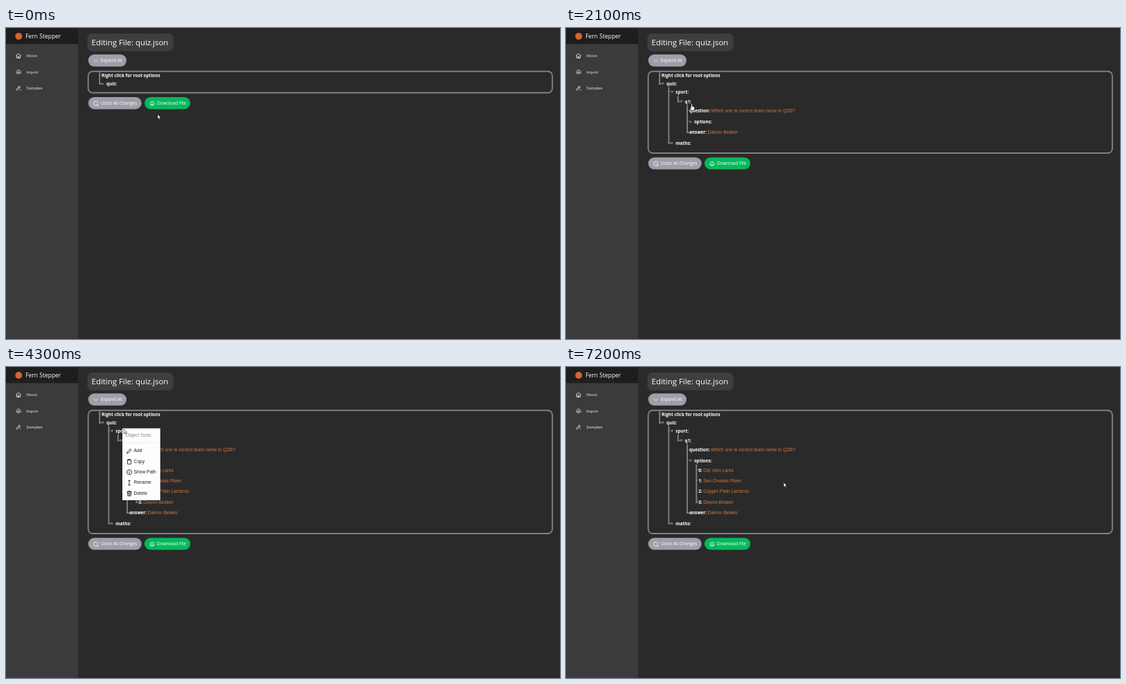
These frames come from a looping animation (800x450 px, 7300 ms). An HTML page:

```html
<!DOCTYPE html>
<html lang="en">
<head>
<meta charset="utf-8">
<title>Tree editor</title>
<style>
html, body { margin: 0; width: 100%; height: 100%; overflow: hidden; background: #2a2a2a; }
svg { display: block; width: 100%; height: 100%; }
text { font: 6.4px "Open Sans", sans-serif; fill: #fff; white-space: pre; }
.key { font-weight: 700; }
.val, .item { font: 6.667px "Liberation Sans", Arial, sans-serif; }
.val { fill: #d4733f; }
.item { fill: #222; }
.head { fill: #8a8a8a; }
.side { font: 6px "Liberation Sans", Arial, sans-serif; fill: #dedede; }
.icon { fill: none; stroke-width: 2.3; stroke-linejoin: round; stroke-linecap: round; }
</style>
</head>
<body>
<svg viewBox="0 0 800 450">
  <rect width="800" height="450" fill="#2a2a2a"/>
  <rect width="104" height="450" fill="#3b3b3d"/>
  <rect width="104" height="23.3" fill="#1e1e1e"/>
  <circle cx="18.3" cy="12" r="5" fill="#d3662c"/>
  <text x="28.2" y="15.4" style="font-size:8.5px">Fern Stepper</text>
  <g id="side"></g>
  <rect x="117.5" y="8" width="124.3" height="25.8" rx="7" fill="#3e3e3f"/>
  <text x="123.6" y="25.2" style="font-size:11.4px;font-weight:500">Editing File: quiz.json</text>
  <g id="expand"></g>
  <rect id="box" x="118.7" y="62.7" width="670.2" rx="6.5" fill="none" stroke="#808080" stroke-width="1.9"/>
  <g id="tree"></g>
  <g id="actions"></g>
  <g id="objMenu"></g>
  <g id="arrMenu"></g>
  <g id="cursor" fill="#fff" stroke="#111" stroke-width=".55" stroke-linejoin="round">
    <path id="arrow" d="M0 0V6.6L1.5 5.2L2.6 7.6L3.6 7.1L2.6 4.8H4.6Z"/>
    <path id="hand" d="M-.9 .6Q0-.6 .9 .6V3.4L3.4 4Q4.4 4.4 4.2 6L3.5 9.3H-.3L-2.4 6Q-2.6 4.6-.9 5.4Z"/>
  </g>
</svg>
<script>
const LOOP = 7300, STEP = 100, ROW = 15.4;
const $ = id => document.getElementById(id);

const cloud = 'M8 18H6A5 5 0 0 1 6 9A6.5 6.5 0 0 1 18.5 9A4.7 4.7 0 0 1 18 18h-2';
const icons = {
  home: 'M3 11L12 3l9 8M5 10v11h14V10M10 21v-6h4v6',
  upload: cloud + 'M12 21v-9M8.5 15l3.5-3.5 3.5 3.5',
  download: cloud + 'M12 11v10M8.5 17.5l3.5 3.5 3.5-3.5',
  tool: 'M3 18L13 8l3 3L6 21zM12 9l3-5 5 5-4 3M17 17l4 4',
  chevron: 'M5 9l7 7 7-7',
  undo: 'M18 18.5a8.8 8.8 0 1 1 2.8-6.5M15.5 16.5l5 .5v5',
  pencil: 'M3 21l1-5L16 4l4 4L8 20z',
  copy: 'M7 5H5v17h14V5h-2M8 3h8v4H8z',
  info: 'M2 12a10 10 0 1 1 20 0a10 10 0 1 1-20 0M12 11v6M12 7v.5',
  rename: 'M8 3h8M12 3v18M8 21h8',
  trash: 'M3 6h18M8 6V3h8v3M5 6l1 16h12l1-16M10 10v8M14 10v8'
};
const icon = (name, x, y, color, size = 8.6) =>
  `<path class="icon" stroke="${color}" d="${icons[name]}" transform="translate(${x - size / 2} ${y - size / 2}) scale(${size / 24})"/>`;
const text = (cls, x, y, s) => `<text class="${cls}" x="${x}" y="${y}">${s}</text>`;
const rect = (x, y, w, h, fill, extra = '') =>
  `<rect x="${x}" y="${y}" width="${w}" height="${h}" fill="${fill}" ${extra}/>`;
const button = (x, w, y, fill, name, label) =>
  rect(x, y - 8.7, w, 17.4, fill, 'rx="8.7"') + icon(name, x + 10.9, y + .4, '#fff') + text('', x + 18, y + 2.2, label);

$('side').innerHTML = [['home', 'About'], ['upload', 'Import'], ['tool', 'Samples']]
  .map(([name, label], i) => icon(name, 18, 40.2 + i * 23.3, '#eee') + text('side', 29.2, 42.2 + i * 23.3, label)).join('');
$('expand').innerHTML = button(118.8, 55.2, 47, '#9f9eaa', 'chevron', 'Expand All');

function menu(x, y, w, title, items) {
  const h = 27 + items.length * ROW;
  return rect(x - 1, y, w + 2, h + 1.5, '#000', 'opacity=".25" rx="1"') +
    rect(x, y, w, h, '#fdfdfd', 'rx=".8"') + text('item head', x + 5, y + 12, title) +
    rect(x + 3, y + 20.6, w - 6, .5, '#dcdcdc') +
    items.map(([name, label], i) => {
      const cy = y + 32.3 + i * 15.35;
      return icon(name, x + 10, cy + .4, '#111') + text('item', x + 16.6, cy + 2.3, label);
    }).join('');
}
const common = [['pencil', 'Add'], ['copy', 'Copy'], ['info', 'Show Path'], ['rename', 'Rename']];
$('objMenu').innerHTML = menu(168, 88.8, 54.8, 'Object Tools', [...common, ['trash', 'Delete']]);
$('arrMenu').innerHTML = menu(196.3, 132.9, 55.3, 'Array Tools', [...common, ['trash', 'Delete One'], ['trash', 'Delete All']]);

// Nodes: key, value for a leaf, or the level at which the kids are open
const leaf = (key, value) => ({ key, value });
const branch = (key, level, ...kids) => ({ key, level, kids });
const quiz = branch('quiz', 1,
  branch('sport', 2,
    branch('q1', 3,
      leaf('question', 'Which one is correct team name in QZB?'),
      branch('options', 4,
        ...['Old Vorn Larks', 'San Orvelas Pikes', 'Copper Plain Lanterns', 'Dalvon Beaker'].map((v, i) => leaf(i, v))),
      leaf('answer', 'Dalvon Beaker'))),
  branch('maths', 9));

const GREY = '#808080';
const railX = depth => 134.2 + 13.3 * depth;

// Draws a node and its open kids; gives the markup and the next free row
function drawNode(node, depth, y, level) {
  const x = 138 + 13.3 * depth;
  if (!node.kids) return [`<text class="key" x="${x}" y="${y + 2.3}">${node.key}:<tspan class="val" style="font-weight:400" dx="1.5">${node.value}</tspan></text>`, y + ROW];
  const open = level >= node.level;
  let out = text('key', x + 7, y + 2.3, node.key + ':') +
    `<path fill="#777" d="${open ? `M${x - .4} ${y - 1.5}h4.6l-2.3 3.6z` : `M${x + .3} ${y - 1.8}v4l3.8-2z`}"/>`;
  if (!open) return [out, y + (depth ? ROW : 14)];
  const rx = railX(depth + 1);
  let next = y + (depth ? 13.8 : 12), last = next;
  node.kids.forEach((kid, i) => {
    last = next;
    const [markup, after] = drawNode(kid, depth + 1, next, level);
    const end = i === node.kids.length - 1;
    out += markup + rect(rx, last - (end ? .8 : .9), end ? 3.8 : 3, end ? 1.8 : 1, GREY);
    next = after;
  });
  return [out + rect(rx, y + 5.6, 1.9, last - y - 4.6, GREY), next];
}

let shown = -1;
function showTree(level) {
  if (level === shown) return;
  shown = level;
  const [markup, bottom] = drawNode(quiz, 0, 80.5, level);
  $('tree').innerHTML = rect(railX(0), 63, 1.9, 18.8, GREY) + rect(railX(0), 80, 3.8, 1.8, GREY) +
    rect(railX(0), 68, 3, 1, GREY) + text('key', 138, 70.9, 'Right click for root options') + markup;
  $('box').setAttribute('height', bottom - 63.4);
  const y = bottom + 14.2;
  $('actions').innerHTML = button(118.8, 77, y, '#9f9eaa', 'undo', 'Undo All Changes') +
    button(200, 66.2, y, '#06b95c', 'download', 'Download File');
}

const clicks = [700, 1500, 2000, 2700];
const path = [
  [0, 219, 125], [600, 152, 81], [900, 152, 81], [1300, 165.5, 93.5], [1600, 165.5, 93.5],
  [1900, 181.5, 110], [2200, 181.5, 110], [2600, 192.5, 135.5], [2900, 192.5, 135.5],
  [3300, 169, 92.5], [3500, 170, 89.5], [4300, 170, 89.8], [4700, 292, 112],
  [4900, 280, 120], [5300, 197, 133.5], [6300, 197, 133.5], [6800, 325, 168], [7100, 324, 167], [7200, 314.3, 167]
];
const hands = [[500, 900], [1200, 1600], [1800, 2200], [2500, 2900], [3200, 3800], [5200, 5500]];

function cursorAt(t) {
  const i = path.findIndex(p => p[0] > t);
  if (i < 0) return path[path.length - 1].slice(1);
  const [t0, x0, y0] = path[i - 1], [t1, x1, y1] = path[i];
  const u = (t - t0) / (t1 - t0), e = u * u * (3 - 2 * u);
  return [x0 + (x1 - x0) * e, y0 + (y1 - y0) * e];
}
const fade = (t, from, to) => t < from || t >= to ? 0 : t < from + STEP ? .5 : 1;

function draw(now) {
  const t = Math.floor(now % LOOP / STEP) * STEP;
  showTree(clicks.filter(c => c <= t).length);
  $('objMenu').setAttribute('opacity', fade(t, 3800, 4600));
  $('arrMenu').setAttribute('opacity', fade(t, 5500, 6700));
  const hand = hands.some(([a, b]) => t >= a && t < b);
  $('hand').setAttribute('opacity', +hand);
  $('arrow').setAttribute('opacity', +!hand);
  $('cursor').setAttribute('transform', `translate(${cursorAt(t)})`);
}

let start;
function tick(now) {
  start ??= now;
  draw(now - start);
  requestAnimationFrame(tick);
}
draw(0);
requestAnimationFrame(tick);
</script>
</body>
</html>
```
